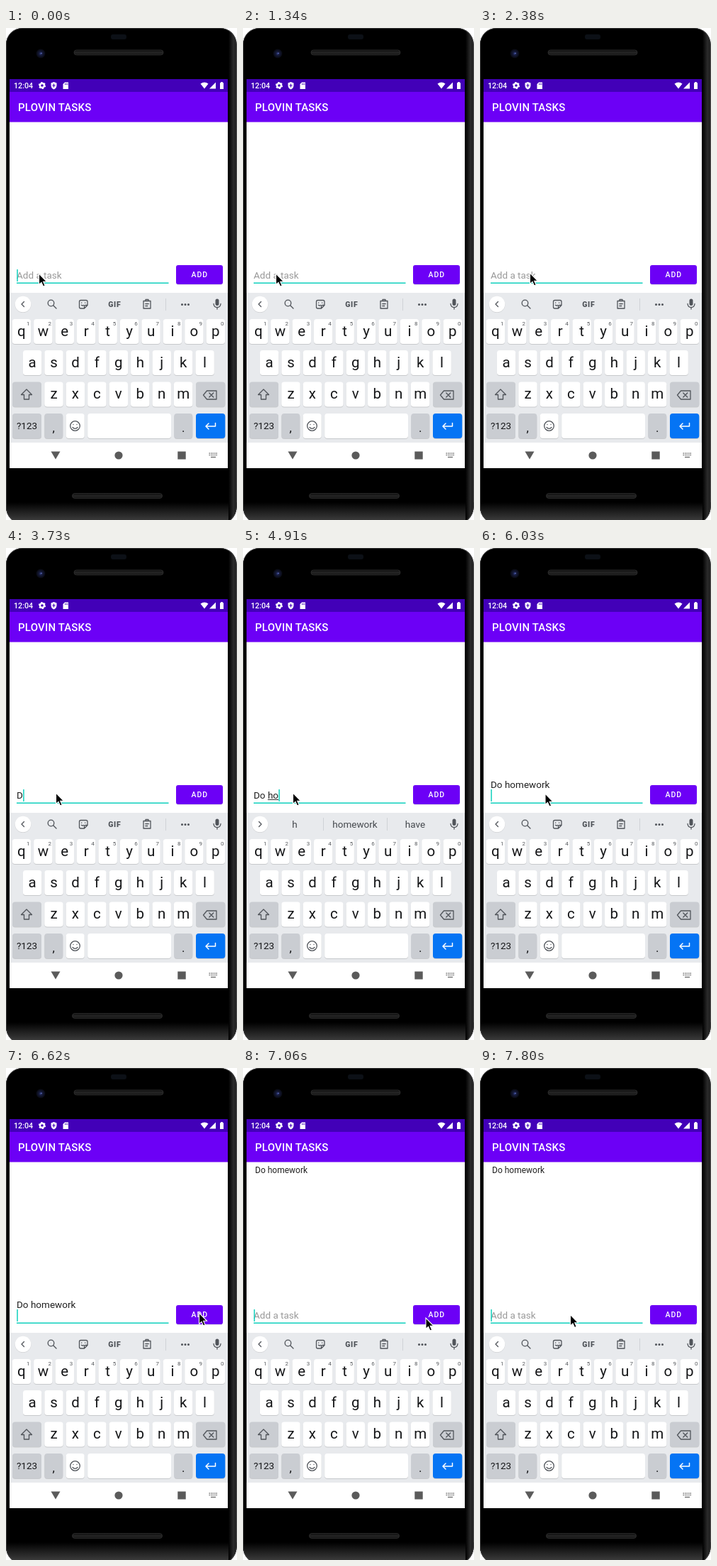
Animation, 326 px wide and 693 px high, one loop 8 s. Source, as an HTML page:

```html
<!DOCTYPE html>
<html lang="en">
<head>
<meta charset="utf-8">
<title>Task list</title>
<style>
  html, body { margin: 0; width: 100%; height: 100%; overflow: hidden; background: #fff; }
  svg { display: block; width: 326px; height: 693px; }
  text { font-family: Roboto, Arial, sans-serif; white-space: pre; }
  .mid { text-anchor: middle; }
  .field { font-size: 13.5px; fill: #212121; }
  .letter { font-size: 20.5px; fill: #151618; }
  .digit { font-size: 8px; fill: #55585c; }
  .word { font-size: 13.5px; fill: #45494e; }
  .line { fill: none; stroke: #50545a; stroke-width: 1.3; stroke-linejoin: round; stroke-linecap: round; }
</style>
</head>
<body>
<svg viewBox="0 0 326 693">
  <defs>
    <linearGradient id="slot" x2="0" y2="1">
      <stop stop-color="#0c0c0c"/><stop offset=".5" stop-color="#252525"/><stop offset="1" stop-color="#141414"/>
    </linearGradient>
    <linearGradient id="chin" x2="0" y2="1">
      <stop stop-color="#000"/><stop offset="1" stop-color="#3a3a3a"/>
    </linearGradient>
    <linearGradient id="side">
      <stop stop-color="#000"/><stop offset=".6" stop-color="#2c2c2c"/><stop offset="1" stop-color="#141414"/>
    </linearGradient>
    <radialGradient id="lens">
      <stop stop-color="#38468c"/><stop offset=".35" stop-color="#161b3c"/><stop offset="1" stop-color="#07080e"/>
    </radialGradient>
    <clipPath id="body"><rect x="0" y="0" width="325.500" height="698" rx="23"/></clipPath>
  </defs>

  <!-- phone body -->
  <g clip-path="url(#body)">
    <rect width="326" height="693" fill="#000"/>
    <rect y="668" width="326" height="25" fill="url(#chin)"/>
    <rect x="314" width="12" height="693" fill="url(#side)"/>
    <rect x="0" y="0" width="325.500" height="698" rx="23" fill="none" stroke="#4a4a4a" stroke-width="1.500"/>
  </g>
  <rect x="148" y="9" width="22" height="7" rx="3" fill="#0c1016"/>
  <g fill="url(#slot)" stroke="#303030" stroke-width=".8">
    <rect x="96" y="31" width="126" height="7" rx="3.500"/>
    <rect x="93.500" y="655.500" width="127" height="7" rx="3.500"/>
  </g>
  <circle cx="49" cy="36" r="6.500" fill="url(#lens)"/>
  <circle cx="50" cy="35.500" r=".8" fill="#6a78c8"/>

  <!-- status and title bars -->
  <rect x="5" y="72" width="308" height="548" fill="#fff"/>
  <rect x="5" y="72" width="308" height="18" fill="#4200b8"/>
  <rect x="5" y="90" width="308" height="42.500" fill="#6c00f6"/>
  <g fill="#fff">
    <text x="11" y="85" font-size="10.700" font-weight="500">12:04</text>
    <circle cx="51" cy="81" r="3" fill="none" stroke="#fff" stroke-width="2.400"/>
    <circle cx="51" cy="81" r="4.400" fill="none" stroke="#fff" stroke-width="1.400" stroke-dasharray="2.300 2.300"/>
    <path d="M67.500 76l4 1.600v3.200q0 4-4 5.600q-4-1.600-4-5.600v-3.200z"/>
    <path d="M67.500 78.600v5M65.300 81h4.400" stroke="#4200b8" stroke-width="1.100"/>
    <path d="M83 76.500h5v9.500h-7.500v-7z"/>
    <path d="M83.500 78v2m1.700-2v2m1.600-2v2" stroke="#4200b8" stroke-width=".8"/>
    <path d="M274.500 78.500q5.500-4 11 0l-5.500 7zM296 76.500v9h-9zM302 77.200h1.200v-1.200h2.600v1.200h1.200v8.800h-5z"/>
    <text x="17" y="117" font-size="15" font-weight="500" letter-spacing=".2">PLOVIN TASKS</text>
  </g>

  <!-- task list and entry row -->
  <text id="item" x="17" y="147.500" font-size="12" fill="#212121">Do homework</text>
  <text id="hint" class="field" x="15" y="353" style="fill:#999">Add a task</text>
  <text id="upper" class="field" x="15" y="337.500"></text>
  <text id="entry" class="field" x="15" y="353"></text>
  <rect id="compose" y="354" height="1" fill="#333"/>
  <rect x="15" y="358.500" width="214.500" height="1.500" fill="#0fd0bd"/>
  <rect id="caret" y="340" width="1.500" height="17" fill="#0fd0bd"/>
  <rect x="240" y="335" width="66" height="27" rx="3" fill="#000" opacity=".1"/>
  <rect x="240" y="334" width="66" height="27" rx="3" fill="#6c00f6"/>
  <rect id="ripple" x="240" y="334" width="66" height="27" rx="3" fill="#fff"/>
  <text class="mid" x="273.300" y="351.300" font-size="10.500" font-weight="500" letter-spacing=".94" fill="#fff">ADD</text>

  <!-- keyboard -->
  <rect x="5" y="373" width="308" height="211" fill="#e8eaed"/>
  <circle cx="24" cy="389.600" r="11.500" fill="#000" opacity=".1"/>
  <circle cx="24" cy="389" r="11.300" fill="#fff"/>
  <path id="chevron" class="line"/>
  <g id="tools">
    <g class="line">
      <circle cx="63.500" cy="387.500" r="4.300"/><path d="M66.700 390.700l4.300 4.300"/>
      <path d="M105.500 383.500h7.500q2 0 2 2v5l-4.500 4.500h-5q-2 0-2-2v-7.500q0-2 2-2zM115 390.500h-3q-1.500 0-1.500 1.500v3M106.500 390.200q1.500 1.500 3 .3M106.700 387v.2M111.700 387v.2"/>
      <path d="M194 384.500h10v10.500h-10zM197 384v-1.500h4v1.500M196.800 388.500h4.400M196.800 391.500h3"/>
    </g>
    <text class="mid" x="153.300" y="392.700" font-size="10.500" font-weight="900" fill="#50545a" letter-spacing=".6">GIF</text>
    <path d="M225.500 381v17" stroke="#cfd2d6"/>
    <g fill="#50545a"><circle cx="248.500" cy="389.500" r="1.500"/><circle cx="253" cy="389.500" r="1.500"/><circle cx="257.500" cy="389.500" r="1.500"/></g>
  </g>
  <g id="words">
    <path d="M113.500 380v18M203.500 380v18" stroke="#cfd2d6"/>
    <text class="word mid" x="73" y="394"></text>
    <text class="word mid" x="158" y="394"></text>
    <text class="word mid" x="243" y="394"></text>
  </g>
  <rect x="295.500" y="381.500" width="5" height="9.500" rx="2.500" fill="#50545a"/>
  <path class="line" d="M293 388.500q.5 5 5 5t5-5M298 393.500v2.500"/>
  <g id="keys"></g>
  <g class="line">
    <path d="M29 509l7.500 7.500h-4v6.500h-7v-6.500h-4z"/>
    <path d="M283.500 511h13.500v12h-13.500l-5-6zM286.800 514l6 6m0-6l-6 6"/>
    <circle cx="97.500" cy="560.500" r="6.800"/>
    <path d="M94 562.500q3.500 3.800 7 0M95 558.300v.3M100 558.300v.3"/>
    <path d="M295.500 556.500v4.500h-13M286 557l-4 4 4 4" style="stroke:#fff;stroke-width:1.500"/>
  </g>

  <!-- navigation bar -->
  <g fill="#5b5b5b">
    <path d="M63.500 596.500h13l-6.500 11z"/>
    <circle cx="159" cy="602" r="5.600"/>
    <rect x="242.300" y="596.500" width="11.400" height="11"/>
    <path d="M286.500 599h12m-12 2.500h12" stroke="#777" stroke-width="1.500" stroke-dasharray="1.500 1"/>
    <path d="M289 604.500h7" stroke="#777" stroke-width="1.500"/>
  </g>
  <path id="mouse" d="M0 0V15.500L3.500 12.300 6 18 8.600 16.900 6.200 11.300H11Z" fill="#000" stroke="#fff" stroke-width="1.100"/>
</svg>
<script>
const $ = id => document.getElementById(id);
const LOOP = 8000;

// Keyboard keys
const GREY = '#cacdd2', WHITE = '#fff', PITCH = 30.44;
let keys = '';
function key(x, y, w, fill, label = '', size = 20.5, dy = 24, digit = '') {
  keys += `<rect x="${x}" y="${y + 1}" width="${w}" height="35" rx="4" fill="#000" opacity=".14"/>
    <rect x="${x}" y="${y}" width="${w}" height="35" rx="4" fill="${fill}"/>
    <text class="letter mid" x="${x + w / 2}" y="${y + dy}" style="font-size:${size}px">${label}</text>
    <text class="digit mid" x="${x + 22.5}" y="${y + 9}">${digit}</text>`;
}
[['qwertyuiop', 8.7, 410], ['asdfghjkl', 23.9, 454], ['zxcvbnm', 54.3, 498.5]].forEach(([row, x, y], r) =>
  [...row].forEach((c, i) => key(x + i * PITCH, y, 26.4, WHITE, c, 20.5, 23.7, r ? '' : (i + 1) % 10)));
key(9, 498.5, 41, GREY);
key(268, 498.5, 41.3, GREY);
key(9, 543, 41, GREY, '?123', 13.5, 22);
key(54.3, 543, 26, GREY, ',', 17, 26);
key(84.7, 543, 26, WHITE);
key(115.2, 543, 117.8, WHITE);
key(237.3, 543, 26, GREY, '.', 17, 26);
key(268, 543, 41.3, '#0574f4');
$('keys').innerHTML = keys;

// Each step: [time, changes to the state so far]
const steps = [
  [0, { text: '', caret: 1, under: 0, words: null, item: 0, ripple: 0, mouse: [46.5, 346] }],
  [300, { caret: 0 }],
  [750, { caret: 1 }],
  [1340, { caret: 0 }],
  [1790, { caret: 1 }],
  [2230, { caret: 0, mouse: [62, 346.5] }],
  [2380, { mouse: [70.5, 345] }],
  [2830, { caret: 1 }],
  [3280, { caret: 0 }],
  [3730, { text: 'D', caret: 1 }],
  [4030, { text: 'Do', under: 1 }],
  [4180, { words: ['Do', 'Don’t', 'Dog'] }],
  [4320, { text: 'Do ', under: 0 }],
  [4470, { words: ['you', 'not', 'the'] }],
  [4760, { text: 'Do h', under: 1 }],
  [4910, { text: 'Do ho', words: ['h', 'homework', 'have'] }],
  [5060, { text: 'Do hom', words: ['ho', 'homework', 'how'] }],
  [5210, { text: 'Do home', words: ['hom', 'homework', 'home'] }],
  [5350, { text: 'Do homewo', words: ['home', 'homework', 'homes'] }],
  [5500, { text: 'Do homework', words: ['homewor', 'homework', ''] }],
  [5880, { text: 'Do homework\n', under: 0 }],
  [6030, { words: null, mouse: [92, 346] }],
  [6180, { mouse: [150, 348] }],
  [6320, { mouse: [215, 347] }],
  [6470, { mouse: [260, 345] }],
  [6620, { mouse: [272.5, 345] }],
  [6770, { ripple: .25 }],
  [6920, { text: '', item: .5, ripple: .12 }],
  [7060, { item: 1, ripple: 0, mouse: [258, 352] }],
  [7210, { mouse: [200, 359] }],
  [7350, { mouse: [146, 355] }],
  [7500, { caret: 0, mouse: [127.5, 347.5] }],
  [7800, { caret: 1 }]
];

function draw(t) {
  const s = Object.assign({}, ...steps.filter(p => p[0] <= t).map(p => p[1]));
  const lines = s.text.split('\n');
  const line = lines.pop();
  const entry = $('entry');
  $('upper').textContent = lines.join('');
  entry.textContent = line;
  $('hint').style.opacity = s.text ? 0 : 1;

  const width = line ? entry.getComputedTextLength() : 0;
  $('caret').setAttribute('x', 15.3 + width);
  $('caret').style.opacity = s.caret;
  const start = line.lastIndexOf(' ') + 1;
  const before = start ? entry.getSubStringLength(0, start) : 0;
  $('compose').setAttribute('x', 15 + before);
  $('compose').setAttribute('width', s.under ? width - before : 0);

  $('tools').style.opacity = s.words ? 0 : 1;
  $('words').style.opacity = s.words ? 1 : 0;
  document.querySelectorAll('.word').forEach((e, i) => e.textContent = s.words ? s.words[i] : '');
  $('chevron').setAttribute('d', s.words ? 'M22.500 385.500l3.500 3.500-3.500 3.500' : 'M25.500 385.500l-3.500 3.500 3.500 3.500');

  $('item').style.opacity = s.item;
  $('ripple').style.opacity = s.ripple;
  $('mouse').setAttribute('transform', `translate(${s.mouse})`);
}

const origin = performance.now();
function tick() {
  draw((performance.now() - origin) % LOOP);
  requestAnimationFrame(tick);
}
tick();
</script>
</body>
</html>
```
